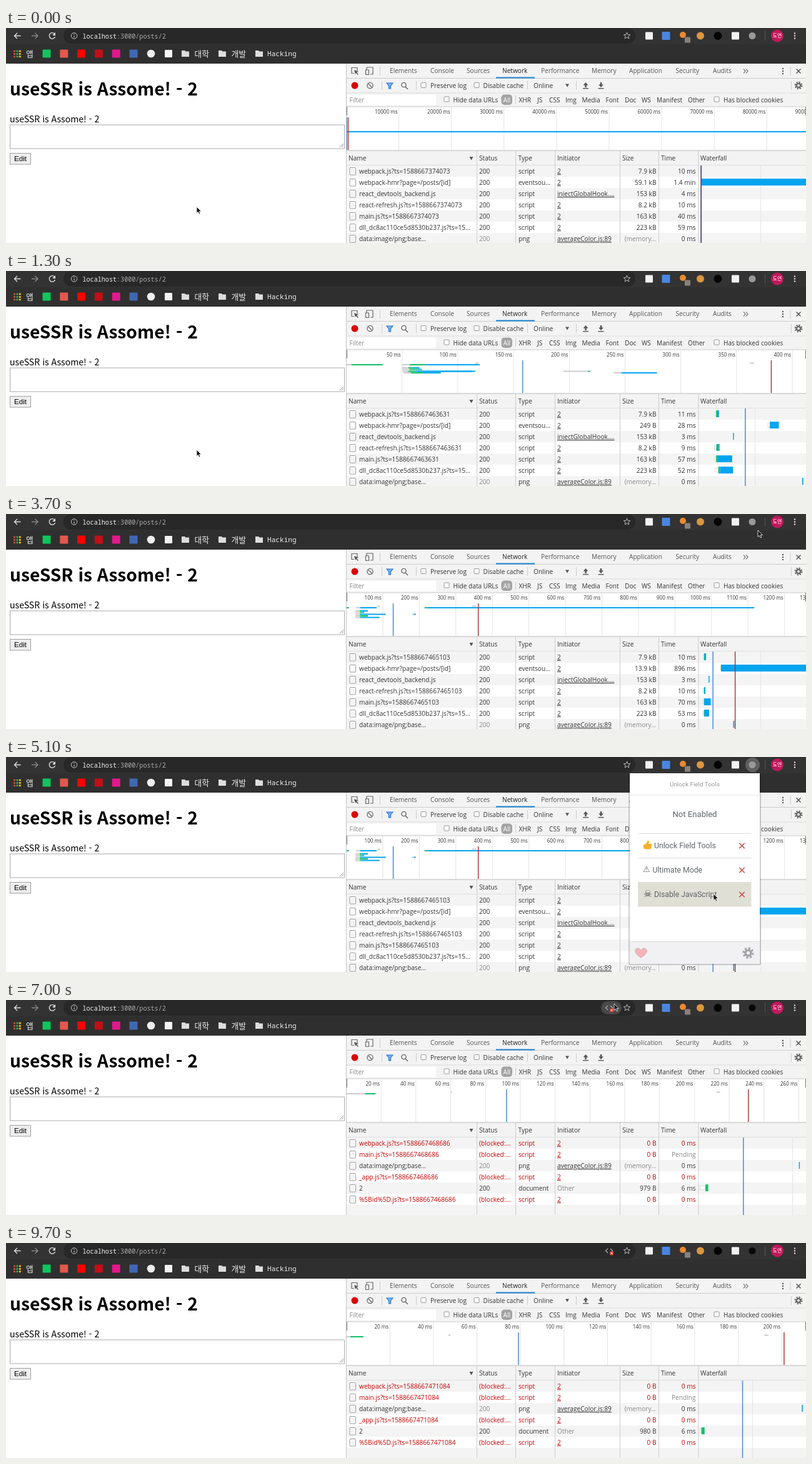
An HTML page that plays this animation: 1280x344 px, repeating every 10000 ms.

```html
<!DOCTYPE html>
<html lang="ko">
<head>
<meta charset="utf-8">
<title>Server rendering check</title>
<style>
html, body { margin: 0; width: 100%; height: 100%; overflow: hidden; background: #fff; }
svg { display: block; width: 100%; height: 100%; }
text { white-space: pre; }
.ui { font-family: "Open Sans", "Noto Sans", sans-serif; font-size: 10.15px; }
.tick { font-family: "Open Sans", sans-serif; font-size: 8.1px; }
.page { font-family: "Noto Sans CJK KR", "Noto Sans CJK", "Noto Sans CJK JP", sans-serif; }
.mono { font-family: "Noto Sans Mono", "Noto Sans CJK KR", monospace; }
.pop { font-family: Roboto, sans-serif; }
</style>
</head>
<body>
<svg viewBox="0 0 1280 344" preserveAspectRatio="none">
  <g id="base"></g><g id="live"></g>
</svg>
<script>
const LOOP = 10000, STEP = 100;
const BLUE = '#03a5ef', GREEN = '#12c06a', WAIT = '#ccc', RED = '#c80000';
const LEFT = 544, RULER = 735, FALL = 1111;

const rect = (x, y, w, h, fill, extra = '') =>
  `<rect x="${x}" y="${y}" width="${w}" height="${h}" fill="${fill}" ${extra}/>`;
const disc = (x, y, r, fill, extra = '') => `<circle cx="${x}" cy="${y}" r="${r}" fill="${fill}" ${extra}/>`;
const path = (d, stroke, w = 1, fill = 'none') =>
  `<path d="${d}" stroke="${stroke}" stroke-width="${w}" fill="${fill}"/>`;
const text = (x, y, s, fill = '#333', cls = 'ui', extra = '') =>
  `<text x="${x}" y="${y}" fill="${fill}" class="${cls}" ${extra}>${s}</text>`;
const vline = (x, y0, y1, c, w = 1) => rect(x, y0, w, y1 - y0, c);
const square = (x, y, s, c) => rect(x - s / 2, y - s / 2, s, s, c, 'rx="1"');
const dots = (x, y, c) => [-4, 0, 4].map(d => disc(x, y + d, 1.2, c)).join('');
const cross = (x, y, r, c, w) => path(`M${x - r} ${y - r}l${2 * r} ${2 * r}m0 ${-2 * r}l${-2 * r} ${2 * r}`, c, w);
const gear = (x, y, r, c, hole) =>
  disc(x, y, r * .85, 'none', `stroke="${c}" stroke-width="${r * .45}" stroke-dasharray="${r * .334}"`) +
  disc(x, y, r * .72, c) + disc(x, y, r * .32, hole);
const folder = x => path(`M${x - 6} 36h5l1.5 1.5h5.5v8.5h-12z`, 'none', 0, '#ddd');
const checkbox = (x, y) => rect(x - 4, y - 4, 8, 8, '#fff', 'rx="1" stroke="#999"');

function browserBar() {
  let s = rect(0, 0, 1280, 57, '#2f2f2f') + rect(0, 0, 1280, 26, '#333') +
    rect(92, 0, 915, 25, '#282828', 'rx="12"');
  s += path('M23.5 12.5h-10m4.5 -4.5l-4.5 4.5l4.5 4.5', '#ddd', 1.4);
  s += path('M41 12.5h10m-4.5 -4.5l4.5 4.5l-4.5 4.5', '#888', 1.4);
  s += disc(109, 12.5, 4.7, 'none', 'stroke="#ccc"') + path('M109 12v3.2M109 9.6v1.2', '#ccc', 1.1);
  s += text(122.5, 16.5, 'localhost<tspan fill="#aaa">:3000/posts/2</tspan>', '#f0f0f0', 'mono', 'font-size="10.1"');
  const star = Array.from({ length: 10 }, (_, i) => {
    const a = -Math.PI / 2 + i * Math.PI / 5, r = i % 2 ? 2.4 : 5.6;
    return (993.5 + r * Math.cos(a)).toFixed(1) + ' ' + (12.5 + r * Math.sin(a)).toFixed(1);
  });
  s += path(`M${star.join('L')}Z`, '#bbb');
  s += square(1029, 12.5, 12, '#f2f2f2') + square(1056, 12.5, 13, '#4a86e0') +
    disc(1083, 11, 5, '#e88a35') + square(1090.5, 19, 9, '#8a807a') + disc(1111, 12.5, 6, '#dd963b') +
    disc(1139, 12.5, 6.5, '#050505') + square(1167, 12.5, 12, '#f2f2f2') +
    vline(1214, 5, 20, '#555') + disc(1234, 12.5, 10, '#c2185b') +
    text(1234, 15.3, '도연', '#fff', 'page', 'font-size="8" text-anchor="middle"') + dots(1262, 12.5, '#ddd');

  const apps = ['#e94335', '#34a853', '#fbbc05', '#4285f4'];
  for (let i = 0; i < 9; i++) s += square(13.5 + i % 3 * 4.4, 37 + Math.floor(i / 3) * 4.4, 3, apps[(i + (i / 3 | 0)) % 4]);
  const marks = ['#0fc65c', '#e2584d', '#f00', '#c20f18', '#e3198b', '#4267b2'];
  marks.forEach((c, i) => s += square(65 + i * 27.8, 41, 13, c));
  s += disc(232, 41, 6.3, '#eee') + square(260, 41, 12, '#f4f4f4');
  s += folder(287) + folder(346) + folder(405);
  [[32, '앱'], [301.5, '대학'], [360.5, '개발']].forEach(([x, label]) => s += text(x, 45.5, label, '#eee', 'page', 'font-size="12.8"'));
  return s + text(418, 45, 'Hacking', '#eee', 'mono', 'font-size="11.1"');
}

function pageView() {
  const title = 'useSSR is Assome! - 2';
  return text(6, 107.5, title, '#000', 'page', 'font-size="28.2" font-weight="700"') +
    text(6, 151, title, '#000', 'page', 'font-size="14.1"') +
    rect(6.5, 155, 535, 38, '#fff', 'stroke="#aaa"') + path('M534 191l6 -6m-3 6l3 -3', '#777', .8) +
    rect(6.5, 200.5, 33, 17.5, '#efefef', 'stroke="#a0a0a0"') +
    text(13, 213, 'Edit', '#000', '', 'font-size="11.6" font-family="Liberation Sans, sans-serif"');
}

function devtools() {
  let s = rect(544, 57, 736, 287, '#fff') + rect(544, 57, 736, 69, '#f3f3f3');
  s += rect(544, 80, 736, 1, '#ccc') + rect(544, 103.5, 736, 1, '#ddd') + rect(544, 125.5, 736, 1, '#ccc');
  s += path('M562 69v-5.5h-9v9h4', '#666', 1.2) + path('M557 67l7 3l-3 1l3 3l-1 1l-3 -3l-1 2z', 'none', 0, '#555');
  s += path('M577 67v-4h10v11h-4M575.5 67h5v7.5h-5z', '#666', 1.2) + vline(598, 62, 76, '#ccc');
  const tabs = [[614, 'Elements'], [679, 'Console'], [737, 'Sources'], [794, 'Network'], [856, 'Performance'],
    [937, 'Memory'], [997, 'Application'], [1071.5, 'Security'], [1131, 'Audits']];
  tabs.forEach(([x, name]) => s += text(x, 72.3, name, name === 'Network' ? '#222' : '#555'));
  s += rect(784, 78.5, 62, 2, '#1a82d2') + path('M1180 65.5l3 3.5l-3 3.5m4 -7l3 3.5l-3 3.5', '#555', 1.1);
  s += dots(1243, 69, '#555') + vline(1254.5, 62, 76, '#ccc') + cross(1268, 69, 3.5, '#444', 1.3);

  s += disc(558, 92, 5.5, '#d80000') + disc(582.5, 92, 4.6, 'none', 'stroke="#666" stroke-width="1.3"') +
    path('M579.5 89l6 6', '#666', 1.2) + vline(601, 85, 99, '#ccc');
  s += path('M609 88h10l-3.5 4.5v4.5h-3v-4.5z', '#1a73d0', 1.1, '#7db4ec');
  s += disc(636.5, 91, 3.6, 'none', 'stroke="#666" stroke-width="1.4"') + path('M639 94l4 4', '#666', 1.6);
  s += vline(656, 85, 99, '#ccc') + checkbox(668, 91.5) + text(679, 95.6, 'Preserve log') + checkbox(753, 91.5) +
    text(763.5, 95.6, 'Disable cache') + vline(834, 85, 99, '#ccc') + text(844, 95.6, 'Online') +
    path('M895 89.5h6l-3 5z', 'none', 0, '#555') + vline(912, 85, 99, '#ccc');
  const arrow = (x, y, dir) => path(`M${x} ${y}l4 ${4.5 * dir}h-2.7v${3.5 * dir}h-2.6v${-3.5 * dir}h-2.7z`, 'none', 0, '#555') +
    rect(x - 4.5, 96, 9, 1.4, '#555');
  s += arrow(927.5, 87, 1) + arrow(952, 95, -1);
  s += vline(1256, 85, 99, '#ccc') + gear(1268, 92, 6, '#666', '#f3f3f3');

  s += rect(546, 106.5, 142, 17, '#fff') + text(549.5, 118.5, 'Filter', '#888') + checkbox(705, 114) + text(715.5, 118.5, 'Hide data URLs');
  s += rect(792.5, 106.5, 17.5, 16.5, '#a3a3a3', 'rx="5"') + text(795.5, 118.5, 'All', '#fff') + vline(815, 108, 121, '#ccc');
  const kinds = [[820.5, 'XHR'], [850, 'JS'], [869, 'CSS'], [895, 'Img'], [921.5, 'Media'], [959.5, 'Font'],
    [990, 'Doc'], [1017, 'WS'], [1041, 'Manifest'], [1091, 'Other']];
  kinds.forEach(([x, name]) => s += text(x, 118.5, name));
  s += checkbox(1137, 114) + text(1148, 118.5, 'Has blocked cookies');

  s += rect(544, 195.5, 736, 24.5, '#f3f3f3') + rect(544, 195.5, 736, 1, '#bbb') + rect(544, 219.5, 736, 1, '#ccc');
  const heads = [[548, 'Name'], [757, 'Status'], [819.5, 'Type'], [882, 'Initiator'], [986, 'Size'], [1048, 'Time'], [1111, 'Waterfall']];
  heads.forEach(([x, name]) => s += text(x, 212, name));
  s += path('M741.5 206h6l-3 5.5z', 'none', 0, '#555');
  for (let i = 0; i < 7; i += 2) s += rect(544, 220 + 18 * i, 736, 18, '#f4f4f4');
  return s;
}

// Request rows: name, status, type, initiator, size, time
const inlineImage = ['data:<tspan>image/png;base…</tspan>', 200, 'png', 'averageColor.js:89', '(memory…', '0 ms'];
const script = (name, size, time, by = '2') => [name, 200, 'script', by, size, time];
const loadedRows = (ts, hmrSize, times) => {
  const t = times.split(',');
  return [
    script(`webpack.js?ts=${ts}`, '7.9 kB', t[0]),
    ['webpack-hmr?page=/posts/[id]', 200, 'eventsou…', '2', hmrSize, t[1]],
    script('react_devtools_backend.js', '153 kB', t[2], 'injectGlobalHook.…'),
    script(`react-refresh.js?ts=${ts}`, '8.2 kB', t[3]),
    script(`main.js?ts=${ts}`, '163 kB', t[4]),
    script('dll_dc8ac110ce5d8530b237.js?ts=15…', '223 kB', t[5]),
    inlineImage
  ];
};
const blockedRows = (ts, size) => {
  const bad = (name, time = '0 ms') => [`${name}.js?ts=${ts}`, '(blocked:…', 'script', '2', '0 B', time];
  return [bad('webpack'), bad('main', 'Pending'), inlineImage, bad('_app'),
    ['2', 200, 'document', 'Other', size, '6 ms'], bad('%5Bid%5D')];
};

// A request: table row (-1 when scrolled out), overview lane, then wait, receive, download and end in ms
const req = (row, lane, wait, green, blue, end) => ({ row, lane, wait, green, blue, end });
const instant = (row, at, end) => ({ ...req(row, 147.5, at, at, at, end), faint: true });

const idle = [0, 2, 3, 4, 5, 6].map(row => req(row, 166, 0, 0, 0, 700));
const runs = [
  { start: 0, loaded: 0, grown: 0, span: 87400, dom: 60, load: 330, grid: 1207, scale: .002,
    rows: loadedRows('1588667374073', '59.1 kB', '10 ms,1.4 min,4 ms,10 ms,40 ms,59 ms'),
    reqs: [...idle, req(1, 166, 0, 0, 0, 90000)] },
  { start: 900, loaded: 1300, grown: 1300, span: 412, dom: 158, load: 381, grid: 1198, scale: .45,
    rows: loadedRows('1588667463631', '249 B', '11 ms,28 ms,3 ms,9 ms,57 ms,52 ms'),
    reqs: [req(-1, 150, 0, 5, 33, 33), req(-1, 150, 50, 57, 72, 120), req(0, 155, 50, 56, 60, 66),
      req(3, 157.5, 50, 57, 65, 68), req(5, 160.5, 51, 64, 70, 116), req(4, 160.5, 51, 56, 62, 113),
      req(-1, 163, 52, 58, 70, 85), instant(2, 116, 119), req(-1, 160.5, 195, 217, 219, 219),
      req(1, 163, 240, 247, 247, 279), instant(6, 362, 366)] },
  { start: 2400, loaded: 2700, grown: 3400, span: 1258, dom: 128, load: 361, grid: 1207, scale: .152,
    rows: loadedRows('1588667465103', '13.9 kB', '10 ms,896 ms,3 ms,10 ms,70 ms,53 ms'),
    reqs: [req(-1, 150, 0, 0, 8, 8), req(-1, 150, 27, 39, 39, 84), req(0, 155, 26, 38, 43, 60),
      req(3, 157.5, 26, 38, 43, 50), req(4, 160.5, 26, 38, 40, 109), req(-1, 163, 26, 38, 60, 60),
      req(5, 165.5, 26, 38, 42, 92), instant(2, 86, 93), req(-1, 160.5, 180, 186, 186, 191),
      req(1, 150, 214, 216, 222, 1118), instant(6, 345, 357)] },
  { start: 5900, loaded: 6300, grown: 6300, span: 264, dom: 92, load: 231, grid: 1258, scale: .74,
    rows: blockedRows('1588667468686', '979 B'),
    reqs: [req(4, 150, 0, 11, 17, 17), instant(-1, 60, 61), instant(2, 213, 215)] },
  { start: 8400, loaded: 8600, grown: 8600, span: 211, dom: 79, load: 201, grid: 1194, scale: .845,
    rows: blockedRows('1588667471084', '980 B'),
    reqs: [req(4, 150, 0, 2, 8, 8), instant(-1, 47, 48), instant(2, 192, 194)] }
];

const ratio = (t, a, b) => b <= a ? 1 : Math.min(1, Math.max(0, (t - a) / (b - a)));

function tickStep(pxPerMs) {
  for (let unit = 1; ; unit *= 10)
    for (const m of [1, 2, 5]) if (unit * m * pxPerMs >= 50) return unit * m;
}

function overview(run, zoom) {
  const k = RULER / (run.span * zoom), step = tickStep(k);
  let s = '';
  for (let n = step; LEFT + n * k < 1315; n += step) {
    const x = LEFT + n * k;
    s += vline(x, 126, 195, '#e4e4e4') + text(x - 1.5, 136.6, `${n} ms`, '#333', 'tick', 'text-anchor="end"');
  }
  const bar = (a, b, y, c) => b > a ? rect(LEFT + a * k, y - 1, Math.max(2, (b - a) * k), 2, c) : '';
  run.reqs.forEach(r => s += bar(r.wait, r.green, r.lane, WAIT) + bar(r.green, r.blue, r.lane, GREEN) +
    bar(r.blue, r.end, r.lane, r.faint ? WAIT : BLUE));
  s += vline(LEFT + run.dom * k, 143, 195, '#4a8ad8', 1.5) + vline(LEFT + run.load * k, 143, 195, '#b0393c', 1.5);
  return s + rect(544, 126, 2, 14, '#777') + rect(1279, 126, 1, 14, '#777');
}

function requestTable(run, zoom, shown, pending) {
  let s = '';
  run.rows.slice(0, shown).forEach(([name, status, type, by, size, time], i) => {
    const y = 233 + 18 * i, bad = status !== 200, c = bad ? RED : '#333', grey = '#888', cached = type === 'png';
    const when = pending && i === 1 ? 'Pending' : time;
    s += rect(550, y - 9.5, 9.5, 11.5, '#fff', 'rx="1" stroke="#999"');
    if (type !== 'eventsou…') s += path(`M552 ${y - 6}h5.5m-5.5 2.5h5.5m-5.5 2.5h5.5`, '#ddd', .8);
    s += text(565, y, name, c) + text(757, y, status, cached ? grey : c) + text(820, y, type, c);
    s += by === 'Other' ? text(882, y, by, grey) : text(882, y, by, c, 'ui', 'text-decoration="underline"');
    s += text(1040.5, y, size, cached ? grey : c, 'ui', 'text-anchor="end"');
    s += text(1103.5, y, when, when === 'Pending' ? grey : c, 'ui', 'text-anchor="end"');
  });
  [753, 815, 878, 982, 1044, 1107.5].forEach(x => s += vline(x, 196, 344, '#ccc'));
  s += vline(run.grid, 220, 344, '#e4e4e4');
  const k = run.scale / zoom, at = ms => FALL + ms * k;
  run.reqs.filter(r => r.row >= 0 && r.row < shown).forEach(r => {
    const y = 223 + 18 * r.row;
    const bar = (a, b, c) => b > a ? rect(at(a), y, Math.max(1.5, (b - a) * k), 11, c) : '';
    if (r.green > r.wait) s += rect(at(r.wait), y + 2.5, (r.green - r.wait) * k, 6, '#fff', 'stroke="#ddd"');
    s += bar(r.green, r.blue, GREEN) + bar(r.blue, r.end, BLUE);
  });
  s += vline(at(run.dom), 220, 344, '#4a8ad8', 1.5);
  return s + vline(at(run.load), 220, 344, '#b0393c', 1.5);
}

function popup(hover) {
  const grey = '#606468', app = 'Unlock Field Tools';
  let s = rect(996, 28, 212, 305, '#000', 'opacity=".18" rx="2"') + rect(998, 26, 208, 305, '#fff');
  s += text(1102, 47, app, '#999', 'pop', 'font-size="9.9" text-anchor="middle"') + rect(998, 60.5, 208, 1, '#e4e4e4');
  s += text(1102, 96, 'Not Enabled', grey, 'pop', 'font-size="13.1" text-anchor="middle"');
  if (hover >= 0) s += rect(1011, 122 + 39 * hover, 181.5, 39.5, '#e0dfd6');
  for (let i = 0; i < 3; i++) s += rect(1011, 122 + 39 * i, 181.5, 1, '#ddd');
  s += path('M1020 140.5l4 -1.5l3 -5q2 -1 2 1.5l-1 3.5h5q1 1 0 2l-1 5q-.5 1.5 -2 1.5h-7l-3 -1.5z', 'none', 0, '#f4ad2c');
  s += text(1019, 184.3, '⚠', grey, '', 'font-size="13" font-family="DejaVu Sans, sans-serif"');
  s += text(1020, 224, '☠', '#444', '', 'font-size="15" font-family="DejaVu Sans, sans-serif"');
  [[1037, app], [1034.5, 'Ultimate Mode'], [1037, 'Disable JavaScript']].forEach(([x, label], i) =>
    s += text(x, 145.8 + 39 * i, label, grey, 'pop', 'font-size="12.2"') + cross(1177.5, 142 + 39 * i, 4.3, '#c94848', 1.5));
  s += rect(998, 295, 208, 36, '#f1f1f3') + rect(998, 295, 208, 1, '#ddd');
  s += path('M1016 321c-14 -9 -9 -15 -5 -15q3 0 5 3q2 -3 5 -3c4 0 9 6 -5 15z', '#d9a0a0', .8, '#f5b4b8');
  return s + gear(1187.5, 313.5, 8.5, '#a2a2a6', '#f1f1f3');
}

// Pointer stops: arrival begins, arrival ends, x, y
const stops = [[0, 0, 305, 286], [2800, 3400, 1132, 28], [3500, 3700, 1203, 26], [4100, 4200, 1194, 20],
  [4600, 5100, 1132, 219], [5300, 5400, 1154, 239], [5400, 5600, 1132, 212], [6300, 6800, 973, 6],
  [7500, 8000, 936, 276], [8100, 8200, 491, 249], [8900, 9000, 259, 165], [9100, 9500, 13, 6]];

function pointer(t) {
  let [, , x, y] = stops[0];
  for (const [a, b, toX, toY] of stops) {
    if (t < a) break;
    const p = ratio(t, a, b);
    x += (toX - x) * p;
    y += (toY - y) * p;
  }
  return [x, y];
}

function scene(t) {
  const run = runs.filter(r => r.start <= t).pop();
  const zoom = run.start ? .15 + .85 * ratio(t, run.start, run.grown) : t < 600 ? 1 : 1.005;
  const shown = Math.floor(run.rows.length * ratio(t, run.start, run.loaded));
  const [x, y] = pointer(t);
  const scriptsOff = t >= 5900, open = t >= 4700 && t < 6300;

  let s = overview(run, zoom) + requestTable(run, zoom, shown, t < run.grown);
  s += vline(544, 57, 344, '#c4c4c4');
  s += t < run.loaded ? cross(74, 12.5, 4.3, '#ddd', 1.4) :
    path('M77.6 9.2a4.8 4.8 0 1 0 1 4.8', '#ddd', 1.4) + path('M79 7v5h-5z', 'none', 0, '#ddd');
  if (scriptsOff) {
    if (t >= 6800 && t < 7600) s += rect(952, 2, 33, 21, '#484848', 'rx="10.5"');
    s += path('M963 9l-3.5 3.5l3.5 3.5m4 -7l3.5 3.5l-1.5 1.5', '#aaa', 1.3) + square(969, 16.5, 6, '#d93a30') + cross(969, 16.5, 1.5, '#fff', 1);
  }
  if (t >= 4400 && t < 6300) s += disc(1194.5, 12.5, 11.5, '#606060');
  s += disc(1194, 12.5, 5.5, scriptsOff ? '#080808' : '#999');
  if (open) {
    const row = Math.floor((y - 122) / 39);
    s += popup(x > 1011 && x < 1192 && row >= 0 && row < 3 ? row : -1);
  }
  if (t < 9700) s += `<path transform="translate(${x} ${y})" d="M0 0v10.5l2.4 -2.2l1.7 3.7l1.8 -.8l-1.7 -3.6h3.3z" fill="#111" stroke="#fff" stroke-width=".8"/>`;
  return s;
}

const live = document.getElementById('live');
document.getElementById('base').innerHTML = rect(0, 0, 1280, 344, '#fff') + browserBar() + pageView() + devtools();

const begin = performance.now();
let last = -1;
function frame() {
  const elapsed = Math.max(0, performance.now() - begin) % LOOP;
  const t = Math.floor(elapsed / STEP) * STEP;
  if (t !== last) live.innerHTML = scene(last = t);
  requestAnimationFrame(frame);
}
frame();
</script>
</body>
</html>
```
